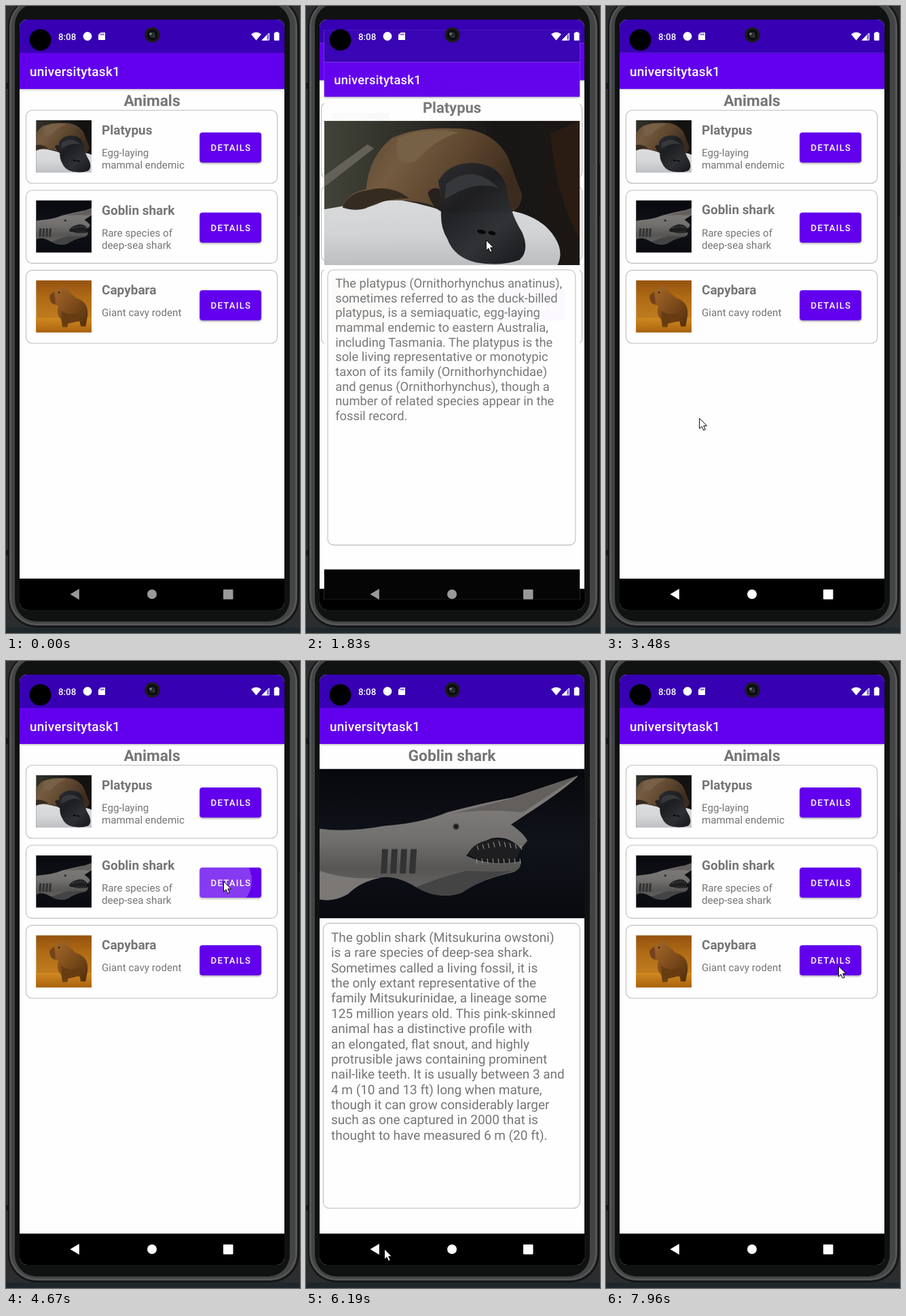
These frames come from a looping animation (433 px wide and 922 px high, 8 s). An HTML page with a canvas:

```html
<!DOCTYPE html>
<html lang="en">
<head>
<meta charset="utf-8">
<title>Animals app</title>
<style>
html, body { margin: 0; width: 100%; height: 100%; overflow: hidden; background: #2b2d2f; }
canvas { display: block; width: 433px; height: 922px; }
</style>
</head>
<body>
<canvas id="stage" width="433" height="922"></canvas>
<script>
const ctx = document.getElementById('stage').getContext('2d');
const LOOP = 8000;
const FONT = 'Roboto, sans-serif';
const GREY = '#757575', PURPLE = '#6200ee', DEEP = '#3700b3', PAPER = '#fefefe';
const CX = 215, CY = 454;

const animals = [
  { name: 'Platypus', sub: ['Egg-laying', 'mammal endemic'], top: 153, button: 186, photo: platypus, text: [
    'The platypus (Ornithorhynchus anatinus),', 'sometimes referred to as the duck-billed',
    'platypus, is a semiaquatic, egg-laying', 'mammal endemic to eastern Australia,',
    'including Tasmania. The platypus is the', 'sole living representative or monotypic',
    'taxon of its family (Ornithorhynchidae)', 'and genus (Ornithorhynchus), though a',
    'number of related species appear in the', 'fossil record.'] },
  { name: 'Goblin shark', sub: ['Rare species of', 'deep-sea shark'], top: 270.7, button: 303.7, photo: shark, text: [
    'The goblin shark (Mitsukurina owstoni)', 'is a rare species of deep-sea shark.',
    'Sometimes called a living fossil, it is', 'the only extant representative of the',
    'family Mitsukurinidae, a lineage some', '125 million years old. This pink-skinned',
    'animal has a distinctive profile with', 'an elongated, flat snout, and highly',
    'protrusible jaws containing prominent', 'nail-like teeth. It is usually between 3 and',
    '4 m (10 and 13 ft) long when mature,', 'though it can grow considerably larger',
    'such as one captured in 2000 that is', 'thought to have measured 6 m (20 ft).'] },
  { name: 'Capybara', sub: ['Giant cavy rodent'], top: 388.3, button: 418, photo: capybara }
];

// Screen changes, taps on list buttons and taps on the back key
const moves = [
  { at: 1732, open: true, item: 0 }, { at: 3140, open: false, item: 0 },
  { at: 4765, open: true, item: 1 }, { at: 6786, open: false, item: 1 }
];
const taps = [{ at: 1570, item: 0 }, { at: 4600, item: 1 }];
const backTaps = [{ down: 2900, up: 3130 }, { down: 6430, up: 6640 }];

// time, x, y of the pointer tip
const pointer = [
  [70, 401, 871], [720, 311, 188], [870, 316, 202], [1500, 316, 204], [1600, 315, 208],
  [1830, 265, 343], [2670, 98, 871], [2740, 98, 872], [2950, 98, 880], [3130, 98, 877],
  [3480, 137, 606], [4330, 320, 322], [4740, 320, 324], [5070, 276.5, 451.5], [5410, 276.5, 451.5],
  [6190, 115, 864], [6700, 115, 864], [6870, 121, 841], [7140, 136, 818], [7960, 342, 448]
];

const clamp = v => Math.max(0, Math.min(1, v));

function slope(i, k) {
  if (i === 0 || i === pointer.length - 1) return 0;
  const [a, b, c] = [pointer[i - 1], pointer[i], pointer[i + 1]];
  const p = (b[k] - a[k]) / (b[0] - a[0]), q = (c[k] - b[k]) / (c[0] - b[0]);
  return p * q <= 0 ? 0 : 2 * p * q / (p + q);
}

function pointerAt(t) {
  const last = pointer[pointer.length - 1];
  if (t >= last[0]) return [last[1], last[2]];
  const i = pointer.findIndex(p => p[0] > t) - 1;
  const a = pointer[i], b = pointer[i + 1], d = b[0] - a[0], u = (t - a[0]) / d;
  return [1, 2].map(k => {
    const e = u * u * (3 - 2 * u);
    return a[k] + (b[k] - a[k]) * e + d * u * (1 - u) * (slope(i, k) * (1 - u) - slope(i + 1, k) * u);
  });
}

const bez = (s, a, b, c, d) => {
  const r = 1 - s;
  return a * r * r * r + 3 * b * s * r * r + 3 * c * s * s * r + d * s * s * s;
};

// Fast out, extra slow in: two joined cubic curves
function ease(x) {
  if (x <= 0) return 0;
  if (x >= 1) return 1;
  const J = 1 / 6, first = x < J;
  const xs = first ? [0, 0.05, 0.133333, J] : [J, 0.208333, 0.25, 1];
  const ys = first ? [0, 0, 0.06, 0.4] : [0.4, 0.82, 1, 1];
  let lo = 0, hi = 1;
  for (let n = 0; n < 24; n++) {
    const m = (lo + hi) / 2;
    if (bez(m, ...xs) < x) lo = m; else hi = m;
  }
  return bez(lo, ...ys);
}

function rect(x, y, w, h, color) {
  ctx.fillStyle = color;
  ctx.fillRect(x, y, w, h);
}

function round(x, y, w, h, r) {
  ctx.beginPath();
  ctx.roundRect(x, y, w, h, r);
}

function fillRound(x, y, w, h, r, color) {
  round(x, y, w, h, r);
  ctx.fillStyle = color;
  ctx.fill();
}

function oval(x, y, rx, ry, turn, color) {
  ctx.beginPath();
  ctx.ellipse(x, y, rx, ry, turn, 0, 7);
  ctx.fillStyle = color;
  ctx.fill();
}

const disc = (x, y, r, color) => oval(x, y, r, r, 0, color);

function shape(d, color) {
  ctx.fillStyle = color;
  ctx.fill(new Path2D(d));
}

function fade(x0, y0, x1, y1, ...colors) {
  const g = ctx.createLinearGradient(x0, y0, x1, y1);
  colors.forEach((c, i) => g.addColorStop(i / (colors.length - 1), c));
  return g;
}

function label(s, x, y, size, { weight = 400, color = GREY, align = 'left', gap = 0 } = {}) {
  ctx.font = `${weight} ${size}px ${FONT}`;
  ctx.textRendering = 'geometricPrecision';
  ctx.letterSpacing = gap + 'px';
  ctx.textAlign = align;
  ctx.fillStyle = color;
  ctx.fillText(s, x, y);
}

// Photos, each on a 390 x 220 field
function platypus() {
  rect(0, 0, 390, 220, fade(0, 0, 390, 0, '#3d4035', '#2a2922', '#131211', '#17120f'));
  shape('M0 84 L66 36 L76 42 L0 101Z', '#65625a');
  shape('M345 20 Q390 0 390 0 V180 Q355 120 345 20Z', '#2b1d14');
  shape('M0 135 Q40 128 90 118 Q140 122 190 140 L290 138 Q334 148 352 178 Q366 200 356 220 H0Z', fade(0, 120, 0, 220, '#dcdddf', '#d6d7d9', '#bfc1c4'));
  shape('M28 132 Q34 110 64 104 Q68 54 104 26 Q142 8 210 12 Q258 16 280 54 L302 112 Q300 138 280 140 L180 136 Q150 118 92 122 Q56 140 28 132Z',
    fade(50, 10, 250, 140, '#55442f', '#755c40', '#5e462f', '#3d2c1e'));
  shape('M28 132 Q36 110 66 106 Q100 96 130 118 Q92 118 62 134 Q44 138 28 132Z', '#352a20');
  shape('M112 26 Q165 8 205 18 Q165 30 140 62 Q104 74 112 26Z', '#776047');
  shape('M158 110 Q164 100 176 104 L184 140 Q166 136 158 110Z', '#25201e');
  shape('M174 92 Q190 64 226 64 Q268 66 278 100 Q282 138 302 170 Q314 198 298 212 Q270 222 232 216 Q198 208 188 180 Q174 158 180 122Z',
    fade(180, 70, 300, 215, '#2a2b2f', '#1d1e21', '#2e2f33', '#17181b'));
  shape('M186 96 Q226 64 266 102 Q228 90 184 120Z', '#37383c');
  oval(240, 169, 7, 3, 0.2, '#08080a');
  oval(256, 171, 6, 3, 0.2, '#08080a');
}

function shark() {
  rect(0, 0, 390, 220, fade(0, 0, 0, 220, '#07080c', '#10131a', '#080a0f'));
  shape('M0 88 Q40 94 95 84 Q150 80 188 64 Q250 48 285 42 L381 10 Q368 26 300 70 L282 82 Q302 96 306 106 L296 118 Q280 98 254 102 Q226 112 216 128 Q250 144 296 136 Q298 146 286 152 Q238 162 210 182 Q176 194 142 174 Q112 156 90 160 Q60 166 42 184 Q22 196 0 192Z',
    fade(0, 60, 0, 190, '#7c7977', '#72706e', '#575655', '#6a6866'));
  shape('M0 150 Q40 164 90 160 Q60 166 42 184 Q22 196 0 192Z', '#7b7875');
  shape('M196 66 L285 43 L381 10 L300 64 Q240 58 196 66Z', '#625f5d');
  shape('M142 174 Q176 160 216 150 Q250 152 286 150 Q238 162 210 182 Q176 194 142 174Z', '#454444');
  shape('M218 126 Q228 106 256 104 Q280 102 296 118 L288 136 Q252 142 218 126Z', '#1e1e20');
  ctx.strokeStyle = '#a5a19b';
  ctx.lineWidth = 1;
  ctx.beginPath();
  for (let i = 0; i < 9; i++) {
    const x = 232 + i * 8, bow = Math.abs(i - 4);
    ctx.moveTo(x, 106 + bow * 1.7);
    ctx.lineTo(x + 2, 114 + bow * 1.3);
    ctx.moveTo(x, 139);
    ctx.lineTo(x - 1, 132);
  }
  ctx.stroke();
  for (let i = 0; i < 4; i++) shape(`M${92 + i * 14} 118 h9 l-2 36 h-9Z`, '#343333');
  disc(201, 85, 4.5, '#363535');
  disc(201, 85, 2.5, '#18181a');
}

function capybara() {
  ctx.translate(78, 0);
  ctx.scale(220 / 77, 220 / 77);
  rect(-28, 0, 140, 77, fade(0, 0, 0, 77, '#95520f', '#b06b15', '#bd7a1e', '#a65f0d'));
  rect(-28, 55, 140, 22, fade(0, 55, 0, 77, '#d08a20', '#a9620e'));
  shape('M20 25 Q20 18 34 12 L39 8 L44 8 L46 14 Q54 22 59 26 Q78 32 76 52 L73 68 H66 L64 60 L48 62 L46 69 H39 L37 58 Q29 50 33 37 Q21 37 20 25Z',
    fade(20, 10, 76, 60, '#a86a2a', '#83501d', '#58320f'));
  shape('M20 25 Q20 20 27 17 L29 35 Q21 36 20 25Z', '#74431a');
  shape('M37 45 Q50 54 65 47 L64 60 L46 64 L39 68 Z', '#683c12');
  disc(34, 18, 1.2, '#2f1a08');
}

function photo(draw, x, y, w, h) {
  const k = h / 220;
  ctx.save();
  ctx.beginPath();
  ctx.rect(x, y, w, h);
  ctx.clip();
  ctx.translate(x + (w - 390 * k) / 2, y);
  ctx.scale(k, k);
  draw();
  ctx.restore();
}

function outline(x, y, w, h) {
  round(x, y, w, h, 9);
  ctx.strokeStyle = '#bdbdbd';
  ctx.lineWidth = 1.1;
  ctx.stroke();
}

function shadow(color, blur, dy) {
  ctx.shadowColor = color;
  ctx.shadowBlur = blur;
  ctx.shadowOffsetY = dy;
}

function page(title) {
  rect(20, 20, 390, 868, PAPER);
  ctx.save();
  shadow('rgba(0,0,0,.3)', 3, 1);
  rect(20, 69, 390, 53, PURPLE);
  ctx.restore();
  rect(20, 20, 390, 49, DEEP);
  label('universitytask1', 35, 103, 18.98, { weight: 500, color: '#fff', gap: 0.25 });
  label(title, 215, 146.7, 22.77, { weight: 700, align: 'center' });
  rect(20, 842, 390, 46, '#000');
}

function button(y, t, item) {
  ctx.save();
  shadow('rgba(0,0,0,.35)', 3, 1.5);
  fillRound(285.3, y, 90.7, 44.3, 4, PURPLE);
  ctx.restore();
  for (const tap of taps) {
    const age = t - tap.at;
    if (tap.item !== item || age < 0 || age > 450) continue;
    const [px, py] = pointerAt(tap.at);
    ctx.save();
    round(285.3, y, 90.7, 44.3, 4);
    ctx.clip();
    ctx.globalAlpha *= 0.24 * clamp(age / 75) * clamp((450 - age) / 200);
    disc(px, py, 20 + 70 * clamp(age / 225), '#fff');
    ctx.restore();
  }
  label('DETAILS', 301.6, y + 27.2, 13.28, { weight: 500, color: '#fff', gap: 1.19 });
}

function list(t) {
  page('Animals');
  animals.forEach((a, i) => {
    outline(29.5, a.top + 0.3, 370, 107.4);
    photo(a.photo, 44.3, a.top + 15, 81.7, 77);
    label(a.name, 141, a.top + 35.8, 18.98, { weight: 700 });
    a.sub.forEach((s, n) => label(s, 141, a.top + 68 + n * 17.9, 15.18));
    button(a.button, t, i);
  });
}

function detail(item) {
  const a = animals[item];
  page(a.name);
  photo(a.photo, 20, 158.5, 390, 220);
  outline(25.4, 385.6, 378, 419.2);
  a.text.forEach((s, n) => label(s, 37, 412.8 + n * 22.39, 18.98));
}

function layer(scale, alpha, draw) {
  if (alpha <= 0) return;
  ctx.save();
  ctx.globalAlpha = alpha;
  ctx.translate(CX, CY);
  ctx.scale(scale, scale);
  ctx.translate(-CX, -CY);
  draw();
  ctx.restore();
}

function windows(t) {
  const m = moves.filter(v => v.at <= t).pop();
  if (!m) return list(t);
  const age = t - m.at, p = ease(age / 400);
  if (m.open) {
    if (age < 400) layer(1 + 0.05 * p, 1, () => list(t));
    layer(0.85 + 0.15 * p, clamp((age - 50) / 50), () => detail(m.item));
  } else {
    layer(1.1 - 0.1 * p, 1, () => list(t));
    layer(1 - 0.1 * p, 1 - clamp((age - 35) / 51), () => detail(m.item));
  }
}

function statusIcons() {
  label('8:08', 77, 49.6, 13.3, { weight: 500, color: '#fff' });
  disc(120, 44.5, 6.4, '#fff');
  shape('M139.5 39 H146 V50 H136 V42.5Z', '#fff');
  for (let i = 0; i < 3; i++) rect(139.4 + i * 2, 40.5, 1, 2.5, DEEP);
  shape('M361 41.5 Q368.5 35.5 376 41.5 L368.5 50.5Z', '#fff');
  shape('M388 39 V50.5 H376.5Z', 'rgba(255,255,255,.35)');
  shape('M384.5 42.4 V50.5 H376.5Z', '#fff');
  ctx.strokeStyle = '#fff';
  ctx.lineWidth = 1;
  ctx.stroke(new Path2D('M387.5 40 V50 H377.5Z'));
  rect(397, 38, 3.5, 2, '#fff');
  fillRound(394.8, 39.3, 7.7, 11.4, 1, '#fff');
}

function navKeys(t) {
  for (const b of backTaps) {
    const a = 0.13 * clamp((t - b.down) / 100) * clamp(1 - (t - b.up) / 320);
    if (a > 0) fillRound(52, 842, 100, 46, 18, `rgba(255,255,255,${a})`);
  }
  const v = Math.round(153 + 102 * clamp((t - 2850) / 80));
  const c = `rgb(${v},${v},${v})`;
  shape('M94.5 865 L107.8 857 V873Z', c);
  disc(215, 865, 7, c);
  fillRound(320, 858, 14.5, 14.5, 1, c);
}

function device() {
  rect(0, 0, 433, 922, '#2b2d2f');
  rect(0, 914, 433, 8, '#1e272c');
  fillRound(3, -12, 429, 926, 42, '#151617');
  fillRound(5, -10, 424, 921, 40, '#565656');
  fillRound(8, -8, 418, 916, 37, '#434445');
  fillRound(13, -4, 405, 909, 32, '#101111');
  rect(0, 113, 3, 9, '#151617');
  rect(0, 800, 3, 8, '#151617');
  rect(431, 232, 2, 78, '#131415');
}

function camera() {
  disc(50.5, 49.8, 15.9, '#000');
  disc(215.5, 42.5, 11.3, '#1b1c1d');
  disc(215.5, 42.5, 8, '#0c0d0e');
  disc(215.5, 42.5, 4.5, '#242a2b');
  disc(213, 41, 1.8, '#7b8585');
  disc(218, 45, 1, '#4c5656');
}

function cursor(t) {
  if (t < 70) return;
  const [x, y] = pointerAt(t);
  ctx.save();
  ctx.translate(x, y);
  const arrow = new Path2D('M.5 .7 V16 L4 12.7 L6.6 18.4 L9.2 17.2 L6.7 11.7 H11.4Z');
  ctx.fillStyle = '#fff';
  ctx.fill(arrow);
  ctx.strokeStyle = '#000';
  ctx.lineWidth = 1;
  ctx.stroke(arrow);
  ctx.restore();
}

function draw(t) {
  device();
  ctx.save();
  round(20, 20, 390, 868, 11);
  ctx.clip();
  rect(20, 20, 390, 868, '#000');
  windows(t);
  statusIcons();
  navKeys(t);
  ctx.restore();
  camera();
  cursor(t);
}

const start = performance.now();
function tick(now) {
  draw(Math.max(0, now - start) % LOOP);
  requestAnimationFrame(tick);
}
draw(0);
requestAnimationFrame(tick);
</script>
</body>
</html>
```
